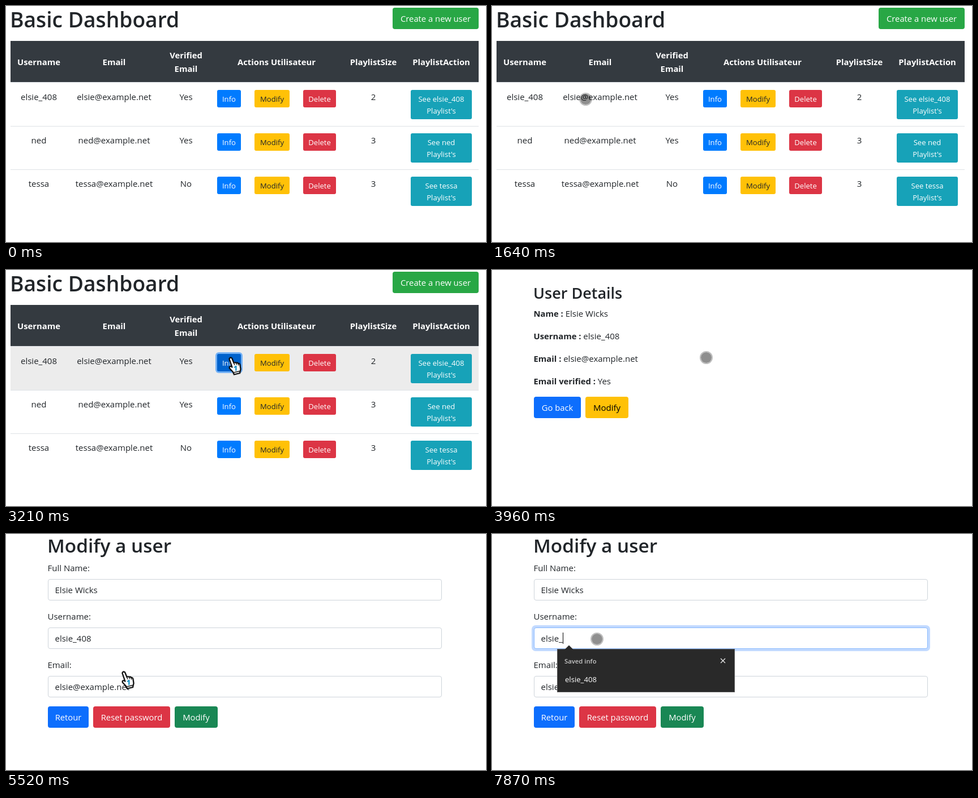
Recreate the animation shown at these times as an HTML page. Size 848 px wide and 419 px high, loop 8 s.

```html
<!DOCTYPE html>
<html lang="en">
<head>
<meta charset="utf-8">
<title>User dashboard</title>
<style>
  html, body { margin: 0; width: 100%; height: 100%; overflow: hidden; background: #fff; }
  svg { display: block; width: 100%; height: 100%; }
  text { font-family: "Open Sans", "Noto Sans", sans-serif; font-size: 15px; fill: #212529; white-space: pre; }
</style>
</head>
<body>
<svg id="stage" viewBox="0 0 848 419"></svg>
<script>
const LOOP = 8000, STEP = 70;
const INK = '#212529', WHITE = '#fff';
const NORMAL = 14.8, SMALL = 13.1;
const user = { name: 'Elsie Wicks', login: 'elsie_408', mail: 'elsie@example.net' };
const stage = document.getElementById('stage');

function add(parent, tag, attrs = {}, content = '') {
  const node = document.createElementNS('http://www.w3.org/2000/svg', tag);
  for (const key in attrs) node.setAttribute(key, attrs[key]);
  node.textContent = content;
  return parent.appendChild(node);
}
const group = (parent = stage) => add(parent, 'g');
const rect = (parent, x, y, width, height, fill, more) =>
  add(parent, 'rect', { x, y, width, height, fill, ...more });

function label(parent, x, y, content, { size = 15, weight = 400, fill = INK, anchor = 'start' } = {}) {
  return add(parent, 'text', {
    x, y, 'text-anchor': anchor,
    style: `font-size:${size}px;font-weight:${weight};fill:${fill}`
  }, content);
}
const centered = (parent, x, y, content, style) =>
  label(parent, x, y, content, { ...style, anchor: 'middle' });

function button(parent, x, y, w, h, color, lines, size = NORMAL, fill = WHITE) {
  const small = size === SMALL;
  rect(parent, x, y, w, h, color, { rx: small ? 3 : 4 });
  const weight = fill === WHITE ? 500 : 400;
  [].concat(lines).forEach((line, i) =>
    centered(parent, x + w / 2, y + (small ? 21 : 25) + i * 21, line, { size, weight, fill }));
}
function ring(parent, x, y, w, h, spread, color) {
  rect(parent, x - spread, y - spread, w + 2 * spread, h + 2 * spread, color, { rx: 3 + spread });
}

// Dashboard
const dashboard = group();
const rowHover = rect(dashboard, 8, 136, 827, 77, '#ececec');
label(dashboard, 7, 38, 'Basic Dashboard', { size: 37.2, weight: 600 });
button(dashboard, 683, 3, 152, 38, '#28a745', 'Create a new user');
rect(dashboard, 8, 62, 827, 73, '#343a40');
rect(dashboard, 8, 135, 827, 1, '#dee2e6');
[[58, 105, 'Username'], [191, 105, 'Email'], [318, 93, 'Verified'], [318, 117, 'Email'],
 [478, 105, 'Actions Utilisateur'], [649, 105, 'PlaylistSize'], [769, 105, 'PlaylistAction']]
  .forEach(([x, y, head]) => centered(dashboard, x, y, head, { size: NORMAL, weight: 700, fill: WHITE }));

[[user.login, user.mail, 'Yes', 2], ['ned', 'ned@example.net', 'Yes', 3], ['tessa', 'tessa@example.net', 'No', 3]]
  .forEach(([login, mail, verified, count], i) => {
    const y = 136 + 77 * i;
    if (i) rect(dashboard, 8, y, 827, 1, '#dee2e6');
    [[58, login], [191, mail], [318, verified], [649, count]]
      .forEach(([x, value]) => centered(dashboard, x, y + 31, value));
    button(dashboard, 373, y + 13, 42, 31, '#007bff', 'Info', SMALL);
    button(dashboard, 439, y + 13, 62, 31, '#ffc107', 'Modify', SMALL, INK);
    button(dashboard, 525, y + 13, 58, 31, '#dc3545', 'Delete', SMALL);
    button(dashboard, 715, y + 13, 108, 52, '#17a2b8', [`See ${login}`, "Playlist's"], SMALL);
  });
const infoPressed = group(dashboard);
ring(infoPressed, 373, 149, 42, 31, 3, 'rgba(0,123,255,.5)');
button(infoPressed, 373, 149, 42, 31, '#0062cc', 'Info', SMALL);

// User details
const details = group();
label(details, 73, 51, 'User Details', { size: 27, weight: 600 });
[['Name', user.name], ['Username', user.login], ['Email', user.mail], ['Email verified', 'Yes']]
  .forEach(([key, value], i) => {
    const line = label(details, 73.5, 83 + 40 * i, '');
    add(line, 'tspan', { style: `font-size:${NORMAL}px;font-weight:700` }, `${key} : `);
    add(line, 'tspan', {}, value);
  });
button(details, 74, 225, 83, 38, '#0d6efd', 'Go back');
button(details, 165, 225, 76, 38, '#ffc107', 'Modify', 15, '#000');
const modifyPressed = group(details);
ring(modifyPressed, 165, 225, 76, 38, 4, 'rgba(217,164,6,.5)');
button(modifyPressed, 165, 225, 76, 38, '#ffcd39', 'Modify', 15, '#000');

// Edit form
const form = group();
label(form, 73, 33, 'Modify a user', { size: 33.4, weight: 600 });
const focusRing = group(form);
ring(focusRing, 74, 166, 696, 38, 4, 'rgba(13,110,253,.25)');
const fields = [['Full Name:', user.name], ['Username:', user.login], ['Email:', user.mail]]
  .map(([caption, value], i) => {
    const y = 80 + 86 * i;
    label(form, 73.5, y - 14, caption);
    const box = rect(form, 74.5, y + .5, 695, 37, WHITE, { rx: 3.5, stroke: '#ced4da' });
    return { box, value: label(form, 86.5, y + 25, value) };
  });
const login = fields[1];
button(form, 74, 306, 72, 38, '#0d6efd', 'Retour');
button(form, 154, 306, 136, 38, '#dc3545', 'Reset password');
button(form, 298, 306, 76, 38, '#198754', 'Modify');
const caret = rect(form, 0, 175, 1, 20, '#000');

const popup = group(form);
rect(popup, 115.5, 204.5, 313, 76, '#292929', { stroke: '#5a5a5a' });
add(popup, 'path', { d: 'M128 205.5L136 197.5L144 205.5Z', fill: '#292929' });
label(popup, 128, 230, 'Saved info', { size: 11.3, weight: 600, fill: '#c8c8c8' });
label(popup, 129, 263, user.login, { size: SMALL, weight: 500, fill: WHITE });
add(popup, 'path', { d: 'M404 221l8 8m0-8l-8 8', stroke: '#eee', 'stroke-width': 1.2 });

// Pointer: a disc while moving, a hand after a click
const disc = group();
add(disc, 'circle', { cx: .5, cy: .5, r: 9.5, fill: 'rgba(0,0,0,.44)' });
add(disc, 'circle', { cx: .5, cy: .5, r: 10.5, fill: 'none', stroke: 'rgba(128,128,128,.5)', 'stroke-width': 2 });
const hand = group();
const handShape = 'M-.5 2Q1-2 4 .5L7.5 9Q10 7.5 11.5 9Q14 8 15 10Q18 9.5 18.5 13L19.5 20L18 27L8 29.5L6 25L0 18.5Q-1 15 2.5 15L4.5 16.5Z';
add(hand, 'path', { d: handShape, fill: 'none', stroke: 'rgba(0,0,0,.15)', 'stroke-width': 4 });
add(hand, 'path', { d: handShape, fill: WHITE, stroke: '#111', 'stroke-width': 2.2, 'stroke-linejoin': 'round' });
add(hand, 'path', { d: 'M7.5 9l1.5 4M11.5 9l1 3.5M15 10l.8 3.5M7.5 26l10.5-2.5', fill: 'none', stroke: '#111', 'stroke-width': 1.3 });
centered(hand, 10.5, 22.5, '1', { size: 12, weight: 800, fill: '#1590c4' });

// Each stretch: start, end, shape, then [time, x, y] points
const strokes = [
  [660, 800, disc, [[660, 61, 286], [730, 33, 247]]],
  [1000, 1140, hand, [[1000, -12, 160], [1070, -6, 160]]],
  [1140, 1910, disc, [[1140, 18, 205], [1210, 38, 245], [1280, 63, 282], [1350, 112, 290],
    [1490, 175, 235], [1560, 182, 200], [1630, 165, 165], [1770, 80, 92]]],
  [1910, 3070, disc, [[1910, 38, 55], [1980, 100, 32], [2050, 180, 23], [2120, 260, 33],
    [2190, 340, 65], [2250, 414, 128], [2400, 408, 147], [2600, 395, 156]]],
  [3070, 3960, hand, [[3070, 395, 156]]],
  [3960, 5320, disc, [[3960, 378, 155], [4100, 325, 139], [4240, 265, 158], [4380, 214, 197],
    [4480, 188, 230], [4580, 196, 243], [4660, 206, 245]]],
  [5320, 6200, hand, [[5320, 206, 245]]],
  [6200, 8000, disc, [[6200, 202, 224], [6340, 187, 190], [6410, 184, 184], [6480, 185, 186]]]
];

function positionAt(points, time) {
  const next = points.findIndex(p => p[0] > time);
  if (next < 0) return points[points.length - 1].slice(1);
  const a = points[Math.max(0, next - 1)], b = points[next];
  const k = Math.max(0, (time - a[0]) / (b[0] - a[0]));
  return [1, 2].map(i => Math.round(a[i] + (b[i] - a[i]) * k));
}

const show = (node, on) => node.setAttribute('visibility', on ? 'inherit' : 'hidden');

function draw(t) {
  show(dashboard, t < 3280);
  show(rowHover, t >= 3070);
  show(infoPressed, t >= 3140);
  show(details, t >= 3280 && t < 5520);
  show(modifyPressed, t >= 5390);
  show(form, t >= 5520);

  const focused = t >= 6940;
  show(focusRing, focused);
  show(caret, focused);
  show(popup, t >= 7470);
  login.box.setAttribute('stroke', focused ? '#86b7fe' : '#ced4da');
  const erased = [7470, 7670, 7870].filter(time => t >= time).length;
  login.value.textContent = user.login.slice(0, user.login.length - erased);
  caret.setAttribute('x', Math.round(86.5 + login.value.getComputedTextLength()));

  const active = strokes.find(([from, to]) => t >= from && t < to);
  for (const shape of [disc, hand]) show(shape, active && active[2] === shape);
  if (active) {
    const [from, , shape, points] = active;
    const [x, y] = positionAt(points, from + Math.floor((t - from) / STEP) * STEP);
    shape.setAttribute('transform', `translate(${x} ${y})`);
  }
}

const start = performance.now();
function frame(now) {
  draw(Math.max(0, now - start) % LOOP);
  requestAnimationFrame(frame);
}
draw(0);
requestAnimationFrame(frame);
</script>
</body>
</html>
```
